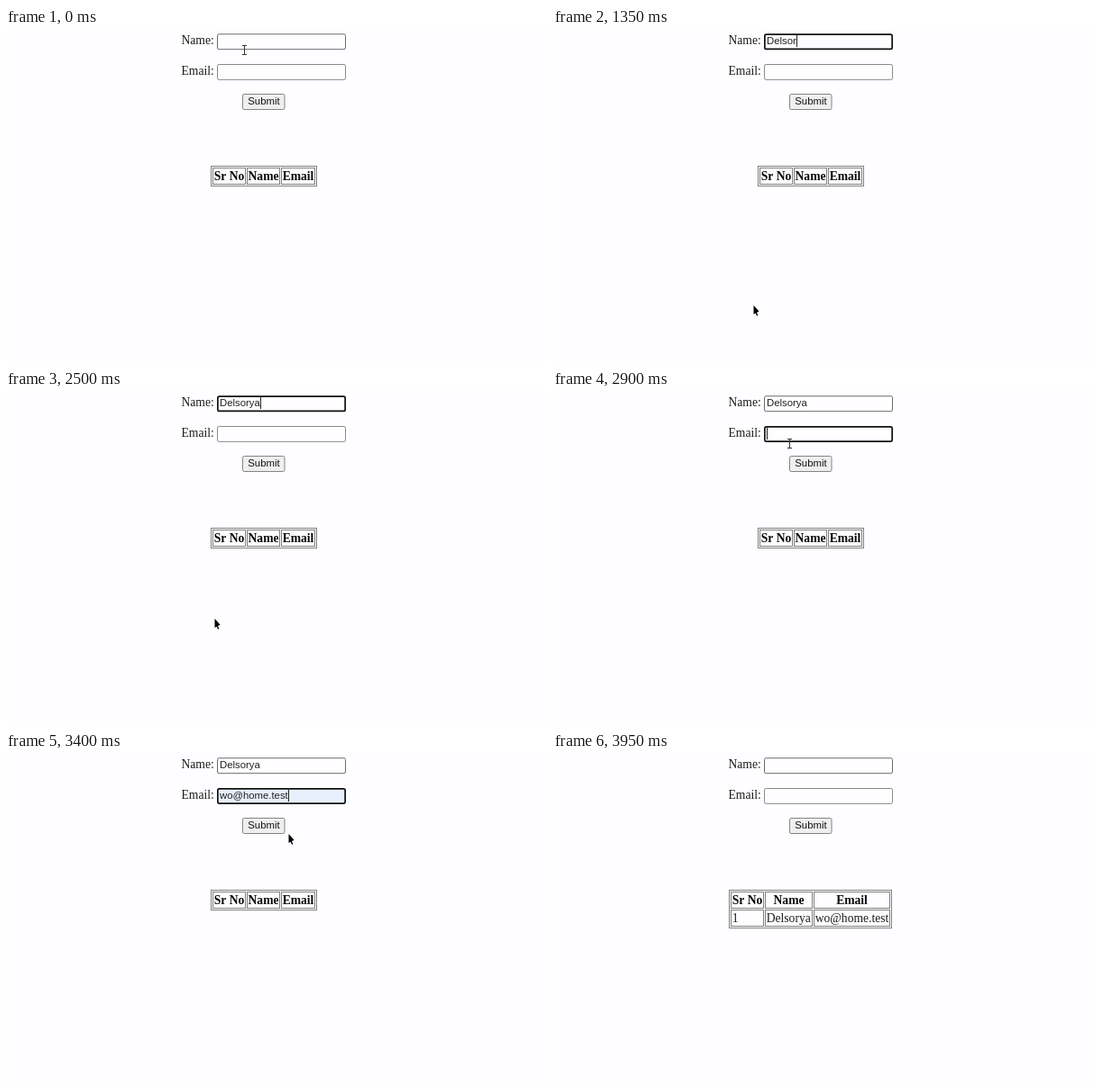
An HTML page with a canvas for the animation above (4.3 s loop, 600 px wide and 371 px high).

```html
<!DOCTYPE html>
<html lang="en">
<head>
<meta charset="utf-8">
<title>Form to table</title>
<style>
  html, body { margin: 0; width: 100%; height: 100%; overflow: hidden; background: #fefdff; }
  canvas { display: block; width: 600px; height: 371px; }
</style>
</head>
<body>
<canvas id="stage" width="600" height="371"></canvas>
<script>
const ctx = document.getElementById('stage').getContext('2d');
const LOOP = 4300, STEP = 50, BLINK = 250;
const PAPER = '#fefdff', LINE = '#808080';
const SERIF = '13.6px "Liberation Serif", serif';
const BOLD = 'bold ' + SERIF;
const SANS = '11.33px "Liberation Sans", sans-serif';
const NAME = 'Delsorya', EMAIL = 'wo@home.test';
const HEADS = ['Sr No', 'Name', 'Email'], ROW = ['1', NAME, EMAIL];

const FOCUS_NAME = 100, ERASE = 1750, FOCUS_EMAIL = 2850, FILL = 3250;
const PRESS = 3600, ADD_ROW = 3700, LEAVE = 3950;

const burst = (start, letters, gap) => Array.from({ length: letters }, (_, i) => start + i * gap);
const KEYS = [...burst(650, 2, 150), ...burst(1050, 4, 100), ...burst(1900, 3, 50)];

const REST = { x: 222, y: 308 }, IN_NAME = { x: 264, y: 24 }, IN_EMAIL = { x: 262, y: 59 };
const ASIDE = { x: 313, y: 91 }, ON_SUBMIT = { x: 298, y: 84 };

function glide(t, start, end, from, to) {
  const p = Math.min(1, Math.max(0, (t - start) / (end - start)));
  const e = p * p * (3 - 2 * p);
  return { x: from.x + (to.x - from.x) * e, y: from.y + (to.y - from.y) * e };
}

function pointerAt(t) {
  if (t < 2250) return glide(t, 50, 550, IN_NAME, REST);
  if (t < 3000) return glide(t, 2350, FOCUS_EMAIL, REST, IN_EMAIL);
  if (t < 3400) return glide(t, 3000, 3400, IN_EMAIL, ASIDE);
  return glide(t, 3400, 3550, ASIDE, ON_SUBMIT);
}

function typing(t) {
  const pressed = KEYS.filter(k => k <= t);
  const erased = t >= ERASE;
  return {
    value: NAME.slice(0, pressed.length - erased),
    since: Math.max(FOCUS_NAME, erased ? ERASE : 0, ...pressed)
  };
}

const caretOn = (t, since) => Math.floor((t - since) / BLINK) % 2 === 0;

function text(str, x, y, font, color = '#1c1c1c', align = 'left') {
  ctx.font = font;
  ctx.fillStyle = color;
  ctx.textAlign = align;
  ctx.fillText(str, x, y);
}

function textWidth(str, font) {
  ctx.font = font;
  return ctx.measureText(str).width;
}

function frame(x, y, w, h) {
  ctx.strokeStyle = LINE;
  ctx.lineWidth = 1;
  ctx.strokeRect(x + .5, y + .5, w - 1, h - 1);
}

function box(x, y, w, h, fill, stroke, line) {
  ctx.beginPath();
  ctx.roundRect(x + line / 2, y + line / 2, w - line, h - line, 1.7);
  ctx.fillStyle = fill;
  ctx.fill();
  ctx.strokeStyle = stroke;
  ctx.lineWidth = line;
  ctx.stroke();
}

function field(y, value, focused, caret, idle, fill = PAPER) {
  box(234, y, 143, 17.9, fill, focused ? '#101010' : idle, focused ? 1.7 : 1);
  text(value, 237, Math.round(y) + 12, SANS, '#222');
  if (focused && caret) {
    ctx.fillStyle = '#222';
    ctx.fillRect(Math.round(237 + textWidth(value, SANS)), Math.round(y) + 2, 1, 13);
  }
}

// Columns fit their widest text; the whole table is centred under the form.
function table(withRow) {
  const widths = HEADS.map((head, i) => Math.round(3.45 +
    Math.max(textWidth(head, BOLD), withRow ? textWidth(ROW[i], SERIF) : 0)));
  const total = widths.reduce((a, b) => a + b) + 6;
  const left = Math.floor(286 - total / 2);
  frame(left, 153, total, withRow ? 43 : 23);
  let x = left + 2;
  widths.forEach((w, i) => {
    frame(x, 155, w, 19);
    text(HEADS[i], x + w / 2, 169, BOLD, '#080808', 'center');
    if (withRow) {
      frame(x, 175, w, 19);
      text(ROW[i], x + 1.7, 188.5, SERIF);
    }
    x += w + 1;
  });
}

function beam(x, y) {
  ctx.fillStyle = '#333';
  ctx.fillRect(x, y - 5, 1, 11);
  for (const dy of [-5, 5]) {
    ctx.fillRect(x - 2, y + dy, 2, 1);
    ctx.fillRect(x + 1, y + dy, 2, 1);
  }
}

function arrow(x, y) {
  ctx.fillStyle = ctx.strokeStyle = '#000';
  ctx.lineWidth = 1.5;
  ctx.beginPath();
  ctx.moveTo(x + .5, y);
  ctx.lineTo(x + .5, y + 10);
  ctx.lineTo(x + 6.5, y + 6.8);
  ctx.fill();
  ctx.beginPath();
  ctx.moveTo(x + 2.5, y + 6.5);
  ctx.lineTo(x + 4.7, y + 11.5);
  ctx.stroke();
}

function pointer(t) {
  const { x, y } = pointerAt(t);
  const overField = x > 234 && x < 377 && [20, 54].some(mid => Math.abs(y - mid) < 10);
  (overField ? beam : arrow)(Math.round(x), Math.round(y));
}

function draw(t) {
  ctx.fillStyle = PAPER;
  ctx.fillRect(0, 0, 600, 371);

  const added = t >= ADD_ROW;
  const filled = t >= FILL && !added;
  const onName = t >= FOCUS_NAME && t < FOCUS_EMAIL;
  const onEmail = t >= FOCUS_EMAIL && t < PRESS;
  const { value, since } = typing(t);

  text('Name:', 194.5, 18, SERIF);
  text('Email:', 194.5, 52, SERIF);
  field(6.3, added ? '' : value, onName, caretOn(t, since), '#6a6a6a');
  field(40, filled ? EMAIL : '', onEmail, caretOn(t, filled ? FILL : FOCUS_EMAIL),
    '#8a8a8a', filled ? '#e8f0fe' : PAPER);

  box(262, 73, 47.5, 18, '#efefef', '#858585', 1);
  text('Submit', 268.3, 85.3, SANS, '#111');

  table(added);
  if (t < LEAVE) pointer(t);
}

const start = performance.now();
function tick() {
  const t = (performance.now() - start) % LOOP;
  draw(Math.floor(t / STEP) * STEP);
  requestAnimationFrame(tick);
}
tick();
</script>
</body>
</html>
```
